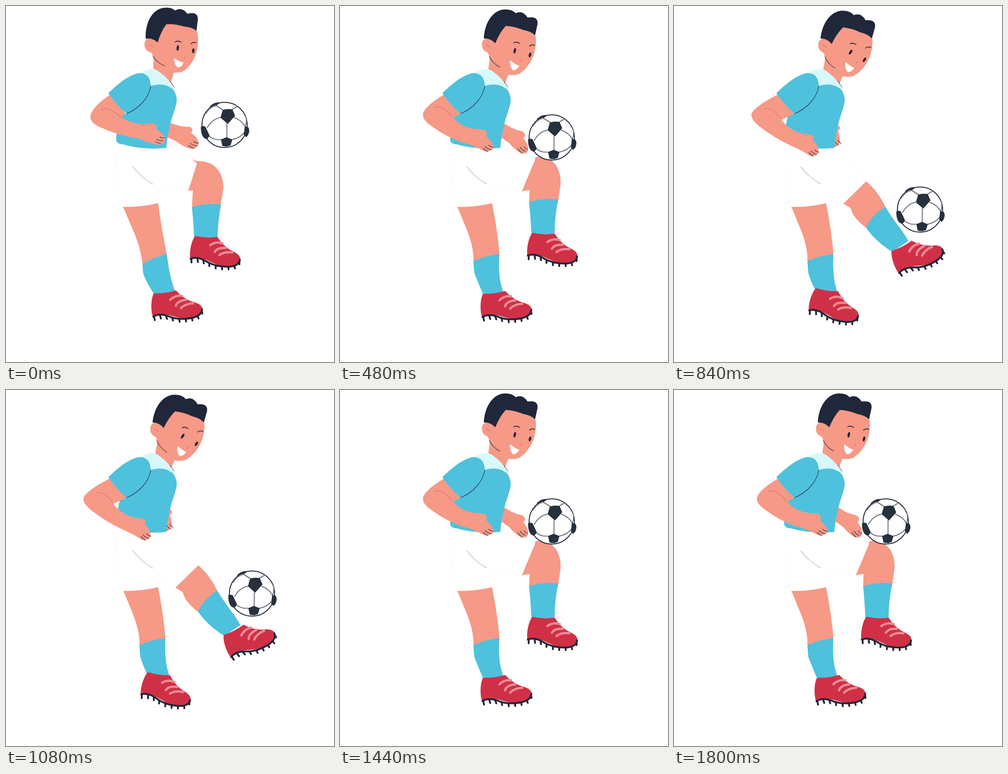
Recreate the animation shown at these times as an HTML page. Size 718 by 780 pixels, loop 1.92 s.

```html
<!DOCTYPE html>
<html lang="en">
<head>
<meta charset="utf-8">
<title>Ball juggling</title>
<style>
html, body { margin: 0; width: 100%; height: 100%; overflow: hidden; background: #fff; }
svg { display: block; width: 718px; height: 780px; }
path { fill: none; stroke-linecap: round; stroke-linejoin: round; }
.skin { fill: #f69987; }
.blue { fill: #4ec1dd; }
.pale { fill: #d7f9fc; }
.navy { fill: #20273a; }
.white { fill: #fff; }
.line { stroke: #2b3040; stroke-width: 1.2; }
.crease { stroke: #d4766a; stroke-width: 1.2; }
.edge { stroke: #efefef; stroke-dasharray: 2 4; }
.red { fill: #d03045; }
.sole { stroke: #20273a; stroke-width: 4; }
.lace { stroke: #f08a96; stroke-width: 5; }
.seam { stroke: #70737f; stroke-width: 2.1; }
</style>
</head>
<body>
<svg viewBox="0 0 718 780">
  <defs>
    <g id="shoe">
      <path class="sole" d="M3 3v7M16 1l1 8M29 6l1 6M42 11v7M56 16v7M70 19v6M84 19v6M97 17l1 6M108 8v6"/>
      <path class="red" d="M13-48Q35-43 60-46C68-34 75-26 87-18C98-12 109-8 110 2C111 10 105 17 90 19C60 23 45 4 20 0Q10-2 0 2C-2-18 4-38 10-47Z"/>
      <path class="sole" d="M1 2C10-2 22-1 38 9C52 17 70 20 88 19Q107 17 109 4"/>
      <path class="lace" d="M44-28q13-9 27-4M54-13q5-10 24-9M64-6q10-8 28-6"/>
    </g>
    <path id="fingers" class="line" d="M-1-6q5 3 10 2M-8-1q7 4 14 3M-11 4q7 4 12 4"/>
  </defs>

  <path id="farArm" class="skin"/>
  <use id="farFingers" href="#fingers"/>

  <path id="thigh" class="skin"/>
  <path id="sock" class="blue"/>
  <use id="standShoe" href="#shoe"/>
  <path id="knee" class="skin"/>
  <path id="kneeSock" class="blue"/>
  <use id="kickShoe" href="#shoe"/>
  <path id="shorts" class="edge"/>
  <path class="edge" d="M241 312Q238 370 255 438M331 402V432"/>
  <path class="line" style="stroke:#aaa" d="M278 352Q294 375 321 390"/>

  <g id="head">
    <path class="skin" d="M351 36Q385 38 417 52Q422 65 420 85C418 110 405 130 390 142Q379 147 367 146L360 172L322 146L323 120Q322 105 316 101C308 100 303 92 303 84C303 74 310 69 320 72L345 36Z"/>
    <path class="navy" d="M306 72C304 40 318 8 345 4Q362 2 370 10Q385 1 397 17Q420 11 420 29L417 54Q406 46 390 45Q370 39 351 40Q339 56 332 80Q320 69 306 72Z"/>
    <path class="crease" d="M312 85L322 89M393 110L390 116"/>
    <path class="line" d="M322 110Q330 124 347 131"/>
    <path id="brows" class="line" style="stroke-width:1.8" d="M370 79Q376 75 383 79M405 83Q410 78 416 80"/>
    <path class="white" d="M368 114Q380 122 389 124Q384 135 376 135Q368 129 368 114Z"/>
    <g id="eyes">
      <g transform="translate(-17 -3)"><ellipse class="eye navy" rx="2.6" ry="6.2"/></g>
      <g transform="translate(17 3)"><ellipse class="eye navy" rx="2.6" ry="5.6"/></g>
    </g>
  </g>

  <path class="blue" d="M290 147L345 168C360 174 372 185 374 205C372 225 362 245 359 262C355 280 352 295 351 311Q300 316 255 303Q240 302 241 290Q242 275 245 260L249 241L264 236Z"/>
  <path class="pale" d="M293 146Q310 137 325 138C345 148 362 166 371 188Q350 165 317 175Q317 155 293 146Z"/>
  <path class="line" style="stroke-width:1" d="M359 165L368 178"/>

  <path id="arm" class="skin"/>
  <path id="crease" class="crease"/>
  <use id="nearFingers" href="#fingers"/>
  <path class="blue" d="M290 147C310 146 318 160 316 178C312 203 290 225 264 236Q240 215 224 191Q262 153 290 147Z"/>
  <path class="line" d="M317 176C312 203 290 225 264 236"/>

  <g id="ball">
    <circle r="49.5" fill="#fff" stroke="#20273a" stroke-width="2"/>
    <path fill="#ccd0da" d="M-42 25Q-25 47 1 48Q27 47 42 25Q24 41 5 42Q-18 42-42 25Z"/>
    <path class="seam" d="M5-2V28M-8 32Q-25 34-35 23M17 32Q33 29 43 17M-38 6Q-27-13-9-16M21-16Q38-10 45 4M-4-33L-18-42M17-34Q25-39 29-41M-18-42Q-32-40-41-25M45 4Q50-8 46-19M5 45V48"/>
    <path class="navy" style="fill:#27303d" d="M-4-33Q6-36 17-34L23-20L7-2L-9-16ZM-8 32L4 27L17 32L13 45Q3 49-5 46ZM-52 4Q-47 1-42 4L-33 23Q-36 31-40 31Q-52 28-52 4ZM44 4Q54 1 54 13Q53 23 47 27L42 22ZM-32-41Q-22-51-9-49L-17-43Q-25-43-33-38Z"/>
  </g>
</svg>
<script>
// Four key poses per part: ball in the air, on the knee, dropping, on the foot.
const shapes = {
  farArm: [
    "M356 255L368 259Q385 265 403 265Q412 270 405 278Q420 288 422 300Q420 314 405 313Q390 310 372 296L354 288Z",
    "M356 255L364 260Q378 270 400 275Q409 282 402 290Q412 302 412 314Q410 326 397 323Q382 315 370 300L353 288Z",
    "M356 258L373 267Q380 272 371 281Q376 292 376 305Q370 318 358 315L349 308Z",
    "M356 262Q363 261 364 268L359 274Q364 288 363 298Q360 309 350 309Z"
  ],
  thigh: [
    "M256 440Q290 442 333 432Q340 485 352 544Q325 550 299 566Q294 525 275 484Q265 460 256 440Z",
    "M257 440Q290 442 333 432Q346 500 349 545Q320 548 292 560Q294 530 276 486Q265 460 257 440Z"
  ],
  sock: [
    "M299 565Q325 550 352 543Q358 595 371 627L324 632Q305 600 301 588Q299 580 299 565Z",
    "M292 559Q320 546 349 544Q345 595 358 628L314 634Q302 605 294 585Q293 575 292 559Z",
    "M292 559Q320 546 349 544Q346 595 357 631L311 631Q302 605 294 585Q293 575 292 559Z",
    "M292 559Q320 546 349 544Q346 595 358 628L310 624Q300 605 294 585Q293 575 292 559Z"
  ],
  knee: [
    "M408 336L418 340C455 338 476 362 476 400L470 435Q435 433 407 442L409 404L399 405L418 345Z",
    "M427 333L429 331C462 327 484 350 483 390L478 425Q445 422 414 431L415 403L398 406L427 337Z",
    "M412 366C435 385 450 405 456 451Q428 455 399 477C388 455 380 445 384 425L371 420Z",
    "M421 384Q448 408 463 441Q436 456 420 486C395 465 390 455 387 443L371 433Z"
  ],
  kneeSock: [
    "M407 441Q435 431 471 435C465 465 464 485 463 508L412 506Q410 470 407 441Z",
    "M414 430Q445 420 478 424C471 455 470 480 470 501L419 499Q417 460 414 430Z",
    "M399 476Q425 455 456 450Q463 490 475 539L426 539Q420 520 399 476Z",
    "M420 485Q436 455 463 440C480 470 500 490 513 515L478 539Q440 515 420 485Z"
  ],
  shorts: [
    "M352 312L412 336M331 400Q370 408 398 406",
    "M352 312L424 332M331 400Q370 408 398 406",
    "M365 318L412 366M331 402L371 420",
    "M367 318L420 384M331 402L371 433"
  ],
  arm: [
    "M262 236L252 242Q270 257 300 259L322 257Q333 261 329 270Q346 280 348 290Q349 304 333 304Q310 301 294 291Q250 285 212 268Q182 257 185 240Q188 222 228 194Z",
    "M264 236L248 245Q265 264 292 269L314 271Q325 274 320 285Q335 298 336 310Q334 320 316 318Q299 309 282 303Q242 293 203 265Q178 249 182 234Q190 216 228 194Z",
    "M264 236L238 252Q255 270 285 276L308 277Q318 279 313 290Q329 302 330 314Q327 325 310 323Q293 313 278 308Q240 302 198 274Q170 258 173 245Q181 225 228 196Z",
    "M264 236L235 249Q250 270 278 279L300 282Q309 286 304 294Q317 306 317 320Q313 331 297 328Q279 316 265 310Q225 293 190 266Q166 248 170 235Q180 218 227 194Z"
  ],
  crease: [
    "M208 228Q225 218 251 244", "M207 222Q225 216 247 245",
    "M198 234Q217 227 238 251", "M197 225Q215 220 234 248"
  ]
};

// x, y, rotation
const places = {
  head: [[347, 131, 0], [350, 134, 5.5], [350, 134, 5.5], [352, 136, 9]],
  brows: [[0, 0, 0], [2, -4, 0], [2, -4, 0], [2, -6, 0]],
  eyes: [[393, 95, 0], [393, 95, 0], [393, 95, 10], [392, 97, 10]],
  farFingers: [[411, 303, 8], [401, 314, 28], [363, 306, 38], [356, 299, 35]],
  nearFingers: [[338, 293, 0], [325, 311, 15], [319, 315, 18], [307, 321, 20]],
  standShoe: [[321, 679, -10], [310.5, 680, -10], [297, 675, 0], [295, 665, 5.5]],
  kickShoe: [[403, 552, 0], [410, 545, 0], [417, 583, 0], [491, 584, -30]]
};
const ballAt = [[478.5, 260.5, 0], [463.5, 288, 0], [495, 378.5, 0], [538.5, 446, 0]];
const eyeTurn = [5, 8, 14, 14];

// The steps run forward, then back.
const bodySteps = [0, 1, 0, 0.5, 1, 2, 2, 3, 2];
const ballSteps = [0, 1, 0, 0.5, 1, 1.5, 2, 3, 2];
const STEP = 120, COUNT = 16;

const $ = id => document.getElementById(id);
const lerp = (a, b, k) => a + (b - a) * k;
const around = (keys, p) => {
  const last = keys.length - 1;
  return [keys[Math.min(Math.floor(p), last)], keys[Math.min(Math.ceil(p), last)], p % 1];
};

function shapeAt(keys, p) {
  const [a, b, k] = around(keys, p);
  if (!k) return a;
  const ends = b.match(/-?\d+/g);
  let i = 0;
  return a.replace(/-?\d+/g, n => lerp(+n, +ends[i++], k));
}

function place(el, keys, p, pivot = "") {
  const [a, b, k] = around(keys, p);
  const [x, y, r] = a.map((v, i) => lerp(v, b[i], k));
  el.setAttribute("transform", `translate(${x} ${y}) rotate(${r}) ${pivot}`);
}

function pose(step) {
  const i = Math.min(step, COUNT - step);
  const p = bodySteps[i];
  for (const id in shapes) $(id).setAttribute("d", shapeAt(shapes[id], p));
  for (const id in places) place($(id), places[id], p, id === "head" ? "translate(-347 -131)" : "");
  place($("ball"), ballAt, ballSteps[i]);
  const [a, b, k] = around(eyeTurn, p);
  for (const eye of document.querySelectorAll(".eye")) eye.setAttribute("transform", `rotate(${lerp(a, b, k)})`);
}

const start = performance.now();
let shown = -1;
function tick() {
  const step = Math.floor((performance.now() - start) / STEP) % COUNT;
  if (step !== shown) pose(shown = step);
  requestAnimationFrame(tick);
}
tick();
</script>
</body>
</html>
```
